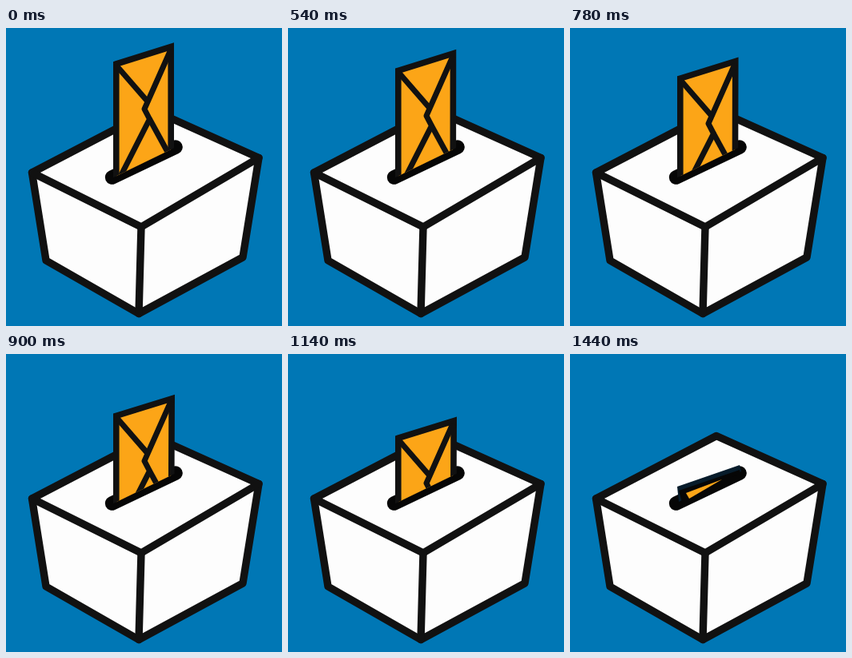
These frames come from a looping animation (345x373 px, 1.8 s). An HTML page with a canvas:

```html
<!DOCTYPE html>
<html lang="en">
<head>
<meta charset="utf-8">
<title>Ballot box</title>
<style>
  html, body { margin: 0; width: 100%; height: 100%; overflow: hidden; background: #0077b5; }
  canvas { display: block; }
</style>
</head>
<body>
<canvas id="stage" width="345" height="373"></canvas>
<script>
const ctx = document.getElementById('stage').getContext('2d');
const LOOP = 1800, STEP = 60, REST = 360, PUSH = 840, GONE = 1440;
const BLUE = '#0077b5', ORANGE = '#fca517', INK = '#111111', BLACK = '#060606';
const WHITE = '#fdfdfd', NAVY = '#071c2b';

// The envelope sinks slowly, then is pushed in with a steady acceleration
function dropAt(t) {
  if (t < REST) return 0;
  const n = Math.floor(t / STEP);
  if (t < PUSH) {
    const s = n === 10 ? 4 : n - 5; // one pose is held twice as long
    return s * (1.9 + 0.045 * s);
  }
  const s = n - PUSH / STEP;
  return 27 + s * (5.1 + 0.31 * s);
}

function trace(points, closed) {
  ctx.beginPath();
  points.forEach(([x, y]) => ctx.lineTo(x, y));
  if (closed) ctx.closePath();
}

function fill(points, color) {
  trace(points, true);
  ctx.fillStyle = color;
  ctx.fill();
}

function line(points, width, closed = false, color = INK) {
  trace(points, closed);
  ctx.lineWidth = width;
  ctx.strokeStyle = color;
  ctx.stroke();
}

function drawBox() {
  const left = [32.5, 181], right = [316, 162.5], front = [169, 249], base = [166, 357.5];
  const outline = [left, [183, 102.5], right, [296, 287], base, [50, 291]];
  ctx.lineJoin = ctx.lineCap = 'round';
  fill(outline, WHITE);
  line(outline, 9.4, true);
  line([left, front, right], 9.4);
  line([front, base], 9.4);
  line([[132.5, 187], [212, 149]], 17.5, false, BLACK);
}

function drawEnvelope(dy) {
  const lean = Math.min(1, dy / 33);
  const body = [[137.8, 45], [206.2 + lean, 23.5], [206.2, 250], [137.8, 250]];
  const tip = [173, 101.5], fold = [179.5, 114];
  ctx.save();
  trace([[120, 0], [230, 0], [230, 140.5], [120, 194]], true);
  ctx.clip();
  ctx.translate(0, dy);
  ctx.lineJoin = 'miter';
  ctx.lineCap = 'butt';
  fill(body, ORANGE);
  line(body, 7.6, true);
  ctx.lineJoin = 'round';
  line([[138, 47], [177, 92]], 7);
  line([[206, 27], tip, fold, [144, 184]], 7);
  line([fold, [203, 157]], 7);
  ctx.restore();
}

// Only the top edge still shows in the slot
function drawEdge() {
  fill([[134, 166], [212, 139], [214, 147], [136, 185]], NAVY);
  fill([[136, 171], [212, 145], [213, 149], [140, 186]], BLACK);
  fill([[145, 174], [190, 157], [149, 181]], ORANGE);
}

function draw(t) {
  ctx.fillStyle = BLUE;
  ctx.fillRect(0, 0, 345, 373);
  drawBox();
  if (t < GONE) drawEnvelope(dropAt(t));
  else drawEdge();
}

let start = null;
function tick(now) {
  if (start === null) start = now;
  draw((now - start) % LOOP);
  requestAnimationFrame(tick);
}
requestAnimationFrame(tick);
</script>
</body>
</html>
```
